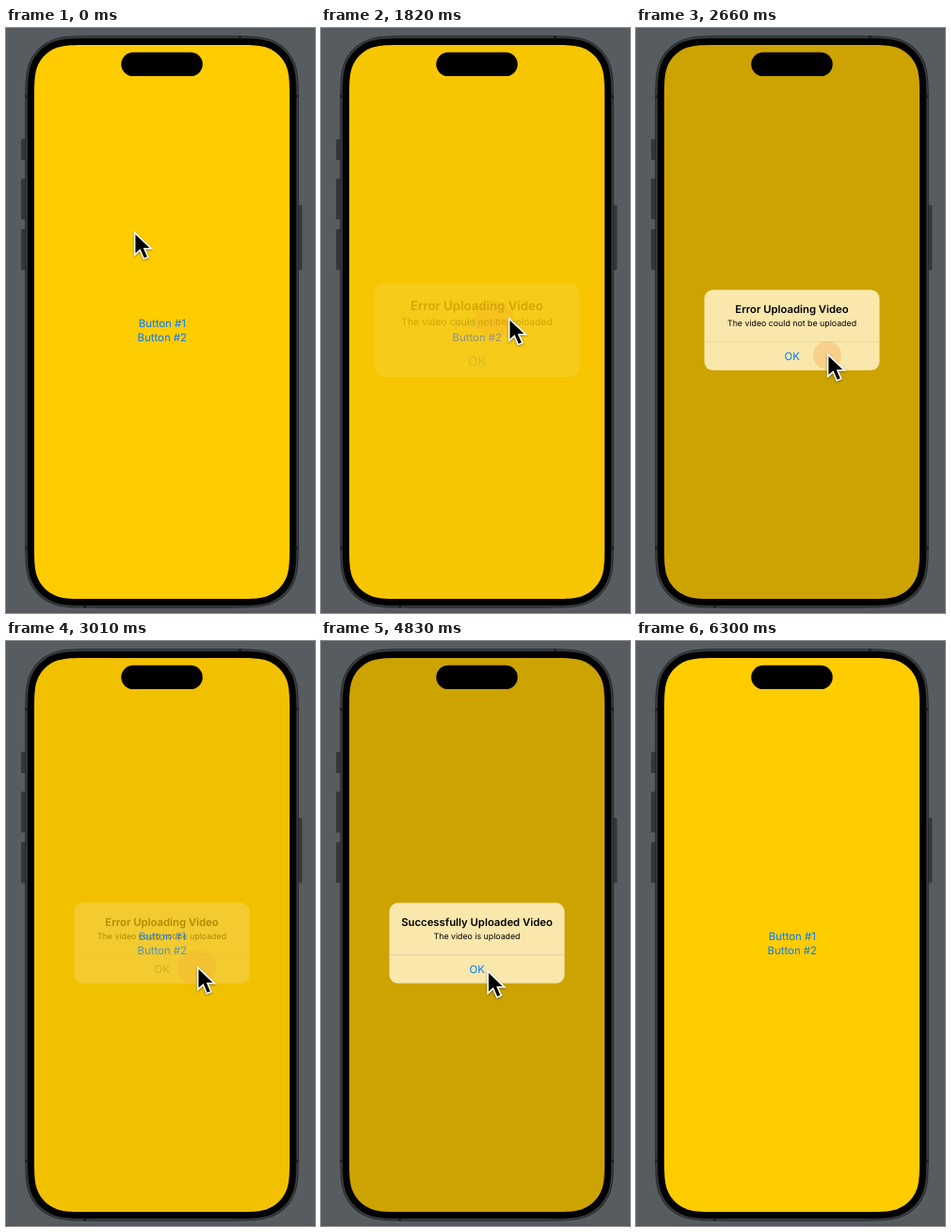
Animation of 328 by 620 pixels, one loop 6930 ms. Source, as an HTML page:

```html
<!DOCTYPE html>
<html lang="en">
<head>
<meta charset="utf-8">
<title>Upload alerts</title>
<style>
  html, body { margin: 0; width: 100%; height: 100%; overflow: hidden; background: #575c61; }
  svg { display: block; width: 328px; height: 620px; }
  text {
    font-family: Inter, Roboto, "Liberation Sans", sans-serif; font-size: 11.4px;
    text-anchor: middle; text-rendering: geometricPrecision;
  }
  #title { font-size: 11.3px; font-weight: 600; }
  #message { font-size: 8.8px; }
  #cursor { filter: drop-shadow(0 1px 1px rgba(0, 0, 0, .4)); }
</style>
</head>
<body>
<svg viewBox="0 0 328 620">
  <rect width="328" height="620" fill="#575c61"/>
  <rect y="617.5" width="328" height="2.5" fill="#59565f"/>

  <g fill="#35383a">
    <rect x="16" y="117.5" width="6" height="22.5" rx="1.5"/>
    <rect x="16" y="159.5" width="6" height="43.5" rx="1.5"/>
    <rect x="16" y="213" width="6" height="43.5" rx="1.5"/>
    <rect x="309" y="187.5" width="5.3" height="69" rx="1.5"/>
  </g>

  <path data-inset="9.7" fill="#222425"/>
  <path data-inset="8.7" fill="#424547"/>
  <path data-inset="7.6" fill="#1d1f20"/>
  <path data-inset="6.8"/>
  <g fill="#1b1c1e">
    <rect x="20.5" y="71" width="3" height="3"/>
    <rect x="307.5" y="71" width="3" height="3"/>
    <rect x="20.5" y="549.5" width="3" height="3"/>
    <rect x="307.5" y="549.5" width="3" height="3"/>
    <rect x="247" y="8.5" width="3" height="3"/>
    <rect x="82" y="611.5" width="3" height="3"/>
  </g>

  <path data-inset="0" fill="#fc0"/>
  <text id="button1" x="165.8" y="317">Button #1</text>
  <text id="button2" x="165.8" y="332">Button #2</text>
  <path id="dim" data-inset="0"/>

  <g id="alert">
    <rect x="72.5" y="277.5" width="186" height="85.3" rx="9" fill="#f9e7ac"/>
    <rect x="72.5" y="332" width="186" height=".8" fill="#3c3c43" opacity=".14"/>
    <text id="title" x="165.5" y="302"></text>
    <text id="message" x="165.5" y="316"></text>
    <text id="ok" x="165.8" y="352.3">OK</text>
  </g>

  <rect x="122.3" y="25.8" width="86.4" height="25.3" rx="12.65"/>
  <circle id="touch" fill="#f59632"/>
  <path id="cursor" d="M.6 1.8V25.4L6.2 20.3L10.3 29.7L14.8 27.7L10.9 18.8H18.4Z" stroke="#fff" stroke-width="1.6"/>
</svg>

<script>
const LOOP = 6930, STEP = 70, FADE = 420, TOUCH = 490;
const GRAY = '#85867a', BLUE = '#007aff';

// time, x, y of the pointer tip
const path = [
  [0, 136, 215], [1120, 183.5, 306], [1680, 183.5, 306], [1950, 213, 306],
  [2520, 203, 344], [3080, 203, 344], [3500, 189, 335], [3780, 176, 328],
  [4270, 176, 328], [4800, 176.5, 348], [5740, 176.5, 348], [6070, 188, 622]
];

// time, x, y of each tap
const taps = [[1400, 184, 309], [2590, 203, 347], [3890, 177, 331], [5500, 177, 351]];

const alerts = [
  { open: 1780, close: 2860, title: 'Error Uploading Video', message: 'The video could not be uploaded' },
  { open: 4200, close: 5750, title: 'Successfully Uploaded Video', message: 'The video is uploaded' }
];

// tap time and release time of each button
const presses = { button1: [1470, 1820], button2: [3920, 4270] };

const el = Object.fromEntries([...document.querySelectorAll('[id]')].map(e => [e.id, e]));
const clamp = v => Math.min(1, Math.max(0, v));
const smooth = p => p * p * (3 - 2 * p);

// phone outline with continuous corners, grown outwards from the screen edge
function outline(inset) {
  const r = 38 + inset, w = 135.5 + inset, h = 293.5 + inset;
  const curve = [[1.529, 0], [1.088, 0], [0.868, 0], [0.631, 0.075], [0.373, 0.169],
    [0.169, 0.373], [0.075, 0.631], [0, 0.868], [0, 1.088], [0, 1.529]];
  const corner = (sx, sy) => {
    const points = curve.map(([x, y]) => [165.5 + sx * (w - r * x), 311.5 + sy * (h - r * y)]);
    if (sx * sy > 0) points.reverse();
    return `${points[0]}C${points.slice(1).join(' ')}`;
  };
  return `M${corner(-1, 1)}L${corner(-1, -1)}L${corner(1, -1)}L${corner(1, 1)}Z`;
}

// critically damped spring from 0 to 1
function spring(age) {
  if (age <= 0) return 0;
  if (age >= FADE) return 1;
  const k = 0.017 * age;
  return 1 - (1 + k) * Math.exp(-k);
}

function pointerAt(t) {
  const i = path.findIndex(k => k[0] > t);
  if (i < 0) return null;
  const [t0, x0, y0] = path[i - 1], [t1, x1, y1] = path[i];
  const p = smooth((t - t0) / (t1 - t0));
  return [x0 + (x1 - x0) * p, y0 + (y1 - y0) * p];
}

function drawPointer(t) {
  const at = pointerAt(t);
  el.cursor.style.display = at ? '' : 'none';
  if (at) el.cursor.setAttribute('transform', `translate(${at})`);
}

function drawTouch(t) {
  const tap = taps.find(k => t >= k[0] && t < k[0] + TOUCH);
  el.touch.style.display = tap ? '' : 'none';
  if (!tap) return;
  const p = (t - tap[0]) / TOUCH;
  el.touch.setAttribute('cx', tap[1]);
  el.touch.setAttribute('cy', tap[2]);
  el.touch.setAttribute('r', 14 + 7 * p);
  el.touch.setAttribute('opacity', 0.3 * clamp(p * 5 + 0.2) * clamp((1 - p) * 4));
}

function drawAlert(t) {
  const a = alerts.find(k => t >= k.open && t < k.close + FADE);
  el.alert.style.display = el.dim.style.display = a ? '' : 'none';
  if (!a) return;
  const shown = spring(t - a.open), left = 1 - spring(t - a.close);
  const scale = 1.2 - 0.2 * shown;
  el.title.textContent = a.title;
  el.message.textContent = a.message;
  el.ok.setAttribute('fill', t < a.close ? BLUE : GRAY);
  el.dim.setAttribute('opacity', 0.2 * shown * left);
  el.alert.setAttribute('opacity', shown * left);
  el.alert.setAttribute('transform', `translate(165.5 320) scale(${scale}) translate(-165.5 -320)`);
}

function drawButtons(t) {
  const covered = alerts.some(a => t >= a.open && t < a.close);
  for (const [id, [down, up]] of Object.entries(presses)) {
    const held = t >= down && t < up;
    const back = t >= up ? clamp((t - up) / 280) : 1;
    el[id].setAttribute('fill', covered ? GRAY : BLUE);
    el[id].setAttribute('opacity', held ? 0.2 : 0.2 + 0.8 * back);
  }
}

for (const shape of document.querySelectorAll('[data-inset]')) {
  shape.setAttribute('d', outline(Number(shape.dataset.inset)));
}

const start = performance.now();

function frame() {
  const now = Math.max(0, performance.now() - start) % LOOP;
  const t = Math.floor(now / STEP) * STEP;
  drawButtons(t);
  drawAlert(t);
  drawTouch(t);
  drawPointer(t);
  requestAnimationFrame(frame);
}
frame();
</script>
</body>
</html>
```
